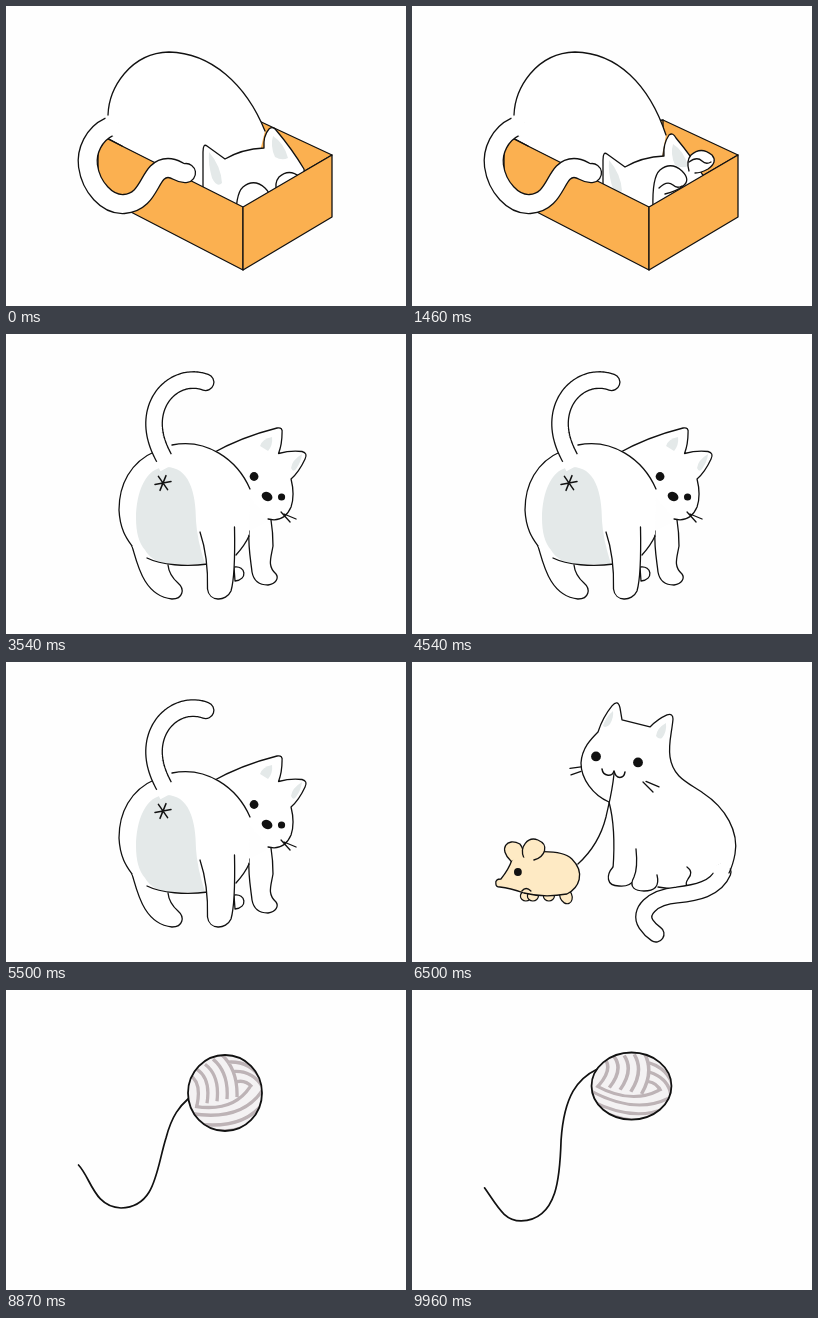
Animation of 400 by 300 pixels, one loop 10 s. Source, as an HTML page with a canvas:

```html
<!DOCTYPE html>
<html lang="en">
<head>
<meta charset="utf-8">
<title>Cats</title>
<style>
html, body { margin: 0; width: 100%; height: 100%; overflow: hidden; background: #fff; }
canvas { display: block; width: 400px; height: 300px; }
</style>
</head>
<body>
<canvas id="stage" width="400" height="300"></canvas>
<script>
const ctx = document.getElementById('stage').getContext('2d');
const INK = '#111', GREY = '#e4e9e9', ORANGE = '#fbb050', TAN = '#feeac4';
const LOOP = 10000;
ctx.lineJoin = 'round';

const wave = (t, period) => (1 - Math.cos(2 * Math.PI * t / period)) / 2;
const mix = (a, b, k) => a + (b - a) * k;

function draw(d, fill, line = 1.3) {
  const p = new Path2D(d);
  if (fill) { ctx.fillStyle = fill; ctx.fill(p); }
  if (line) {
    ctx.strokeStyle = INK;
    ctx.lineWidth = line;
    ctx.lineCap = 'round';
    ctx.stroke(p);
  }
}

function oval(x, y, rx, ry = rx, turn = 0, fill = INK, line = 0) {
  ctx.beginPath();
  ctx.ellipse(x, y, rx, ry, turn, 0, 7);
  ctx.fillStyle = fill;
  ctx.fill();
  if (line) { ctx.lineWidth = line; ctx.strokeStyle = INK; ctx.stroke(); }
}

function at(x, y, fn) {
  ctx.save();
  ctx.translate(x, y);
  fn();
  ctx.restore();
}

// White tube with an ink edge; the root hides the cap where it joins the body.
function tube(path, width, root) {
  for (const [color, w] of [[INK, width + 1.3], ['#fff', width - 1.3]]) {
    ctx.lineCap = 'round';
    ctx.strokeStyle = color;
    ctx.lineWidth = w;
    ctx.stroke(path);
  }
  ctx.lineCap = 'butt';
  ctx.lineWidth = width + 2;
  ctx.stroke(new Path2D(root));
}

function boxScene(t) {
  const q = wave(t, 973);
  draw('M251 114L326 149L237 201L104 133Z', ORANGE);
  draw('M251 114V150');
  const back = `M102 109C103 82 124 47 163 46C205 47 ${240 - 3 * q} 78 ${259 - 5 * q} ${125 + 4 * q}`;
  draw(back + 'L240 202L190 178L103 133Z', '#fff', 0);

  at(-6 * q, 8 * q, () => {
    draw(`M197 185V146Q197 137 201 140L219 153Q236 143 258 142
      Q257 130 263 ${123 - 2 * q}Q267 ${120 - 2 * q} 270 124Q286 143 298 163L300 190L240 215Z`, '#fff');
    draw('M203 146Q202 158 206 172Q211 182 216 177Q215 160 203 146Z', GREY, 0);
    draw('M267 130Q264 140 269 151Q276 155 282 152Q278 137 267 130Z', GREY, 0);
  });

  at(mix(246, 257, q), mix(191, 174, q), () => {
    draw('M-16 28Q-17 -3 -9 -10Q2 -19 13 -9Q22 0 14 6Q8 11 -4 14', '#fff');
    if (q > 0.3) draw('M-10 8Q-2 0 4 5Q8 9 13 6');
  });
  at(mix(283, 289, q), mix(177, 155, q), () => {
    draw('M-12 10Q-15 0 -10 -6Q0 -15 11 -6Q17 1 7 8Q0 12 -6 12', '#fff');
    if (q > 0.3) draw('M-12 1Q-4 -5 1 0Q5 4 10 1');
  });

  draw('M92 128L237 201V264L92 189Z', ORANGE);
  draw('M237 201L326 149V211L237 264Z', ORANGE);
  tube(new Path2D(`M103 121C88 128 80 145 82 160C85 181 101 199 118 198
    C146 196 142 162 162 162C171 162 173 168 180 167`), 19, 'M103 121L113 117');
  draw('M103 133L116 140');
  draw(back);
}

function waggingTail(w) {
  const path = new Path2D(), steps = 40, step = 114 / steps;
  const heading = s => w * (-28 + 140 * s ** 1.4) * Math.PI / 180;
  const x0 = 158, y0 = 124;
  let x = x0, y = y0;
  path.moveTo(x, y);
  for (let i = 0; i < steps; i++) {
    const a = heading((i + 0.5) / steps);
    x += step * Math.sin(a);
    y -= step * Math.cos(a);
    path.lineTo(x, y);
  }
  const a = heading(0);
  tube(path, 16.5, `M${x0} ${y0}L${x0 - 10 * Math.sin(a)} ${y0 + 10 * Math.cos(a)}`);
}

function backScene(t) {
  const k = wave(t, 1000);
  const w = 1 - (t >= 2000 ? 2.1 : 0.2) * k;

  draw('M228 233C240 231 242 246 229 247Z', '#fff');
  draw(`M243 197C242 214 245 228 246 238C248 249 256 251 262 251C270 250 273 244 270 240
    C261 232 265 224 267 212Q267 198 265 186`, '#fff');
  at(12 * k, 0, () => {
    draw(`M205 120Q235 103 271 94Q277 93 276 99Q276 110 272.5 119.5Q285 116 296 117.5
      Q302 119 299 125Q293 138 285 145Q289 161 285 173Q278 189 262 185`, '#fff');
    draw('M266 103Q256 105 254 112L262 117Q267 111 266 103Z', GREY, 0);
    draw('M296 120Q286 126 285 134Q287 139 290 135Q295 128 296 120Z', GREY, 0);
    oval(248, 142.5, 4.4);
    oval(275.5, 163, 3.6);
    oval(261, 162.5, 5.6, 4.4, 0.45);
    draw('M275 178L284 188M278 180L290 185');
  });
  draw('M126 212C131 228 137 262 166 265C177 265 179 255 172 249Q163 241 162 231', '#fff');
  draw(`M150 117C124 128 113 151 113 176C114 196 121 205 126 212Q135 226 159 230H197L229 221L243 200
    L244 155C231 125 200 104 166 111Z`, '#fff', 0);
  draw('M150 117C124 128 113 151 113 176C114 196 121 205 126 212M166 111C200 104 231 125 244 155M230 221Q239 211 243 202');
  draw(`M160 133C139 133 130 160 130 184Q130 206 139 216Q147 230 168 230H199
    Q191 205 190 187C190 158 183 133 160 133Z`, GREY, 0);
  draw('M141 224C155 231 180 233 202 230');
  draw(`M194 198C201 219 202 238 201.5 255C203 268 220 268 225 257C229 243 229 218 228.5 193`, '#fff');
  draw('M196 199L227 194', '#fff', 0);
  draw('M149 150.4L165 147.6M152.4 142.4L161.6 155.6M160 141.6L154 156.4', null, 1.5);
  waggingTail(w);
}

function mouse(x) {
  at(x, 0, () => {
    for (const fx of [114, 121, 137]) oval(fx, 234, 5.5, 5, 0, TAN, 1.2);
    oval(154, 234, 6, 8, -0.4, TAN, 1.2);
    draw(`M84 222Q83 217 89 217Q97 207 100 198C111 187 150 187 160 197
      C174 211 167 226 155 232Q132 236 112 231Q98 226 88 225Q84 225 84 222Z`, TAN);
    draw('M99 199C86 187 95 175 108 182Q112 187 112 194', TAN);
    draw('M112 196C107 185 116 174 126 178C138 183 133 195 122 198', TAN);
    draw('M101 200Q106 193 119 197L120 205L104 208Z', TAN, 0);
    oval(106, 210, 3.9);
    draw('M110 229Q114 224 119 229');
  });
}

function toyScene(t) {
  const k = wave(t, 1000), h = -15 * k, swing = -28 * k;
  const y = v => v + h;
  const outline = `M201 207Q204 166 197 140C181 ${y(133)} 169 ${y(117)} 169 ${y(101)}
    C170 ${y(86)} 179 ${y(77)} 186 ${y(70)}Q191 ${y(55)} 200 ${y(44)}Q206 ${y(37)} 208 ${y(46)}
    L210 ${y(58)}L238 ${y(65)}Q246 ${y(57)} 255 ${y(53)}Q261 ${y(51)} 261 ${y(57)}
    C260 ${y(70)} 256 ${y(82)} 258 ${y(95)}C261 116 277 121 291 131
    C314 146 327 170 323 192Q321 203 317 211`;
  draw(outline + 'L300 222L246 227L202 220Z', '#fff', 0);
  draw('M246 225Q262 228 279 227M275 205Q282 210 276 217Q270 226 284 227');
  tube(new Path2D('M311 210C304 227 284 231 265 233C240 235 226 250 234 262Q238 268 244 272'),
    16, 'M311 210L307 202');
  draw(outline);
  draw('M201 205C194 213 194 224 207 224Q218 225 222 218L220 195Z', '#fff', 0);
  draw('M201 205C194 213 194 224 207 224Q218 225 222 218');
  draw('M224 187Q226 206 222 215C216 226 224 229 232 229C242 229 248 225 245 213', '#fff');
  draw(`M202 ${y(112)}C200 ${y(132)} 196 145 ${194 + swing / 4} 155Q${187 + swing / 2} 183 ${166 + swing} 202`);

  at(0, h, () => {
    draw('M201 49Q193 56 191 64Q194 67 198 62Q202 55 201 49Z', GREY, 0);
    draw('M254 61Q245 66 244 74Q247 78 250 76Q255 70 254 61Z', GREY, 0);
    oval(184, 94.5, 4.9);
    oval(226, 100.5, 4.9);
    draw('M190 107C191 115 201 115 202 109C204 118 212 117 213 110', null, 1.5);
    draw('M158 106.5L169 105M159 113L169 109.5M231 120L241 130M234 119.5L247 125');
  });
  mouse(swing);
}

function ballScene(t) {
  const u = wave(t - 1350, 623), m = (a, b) => mix(a, b, 2 * u);
  const endY = 108 - 78 * u + 40 * u * u;
  draw(`M72.5 ${m(175, 198)}C${m(85, 86)} ${m(188, 217)} ${m(88, 92)} ${m(217, 231)} ${m(115, 109)} ${m(218, 231)}
    C${m(150, 146)} ${m(217, 230)} ${m(150, 148)} ${m(180, 185)} ${m(160, 149)} ${m(148, 150)}
    C${m(166, 152)} ${m(125, 105)} ${m(174, 166)} ${m(116, 88)} ${m(183, 185)} ${endY}`, null, 1.7);

  const rx = 37 + 2 * u + 8 * u * u, ry = 38 - 9 * u;
  const cx = 219 + 2 * u * u, cy = 103 - 14 * u;
  ctx.save();
  ctx.translate(cx, cy);
  ctx.scale(rx / 37, ry / 37);
  oval(0, 0, 37, 37, 0, '#f4f2f3');
  ctx.beginPath();
  ctx.arc(0, 0, 37, 0, 7);
  ctx.clip();
  ctx.rotate(0.85 * u);
  ctx.strokeStyle = '#bdb3b6';
  ctx.lineWidth = 3.3;
  ctx.lineCap = 'butt';
  let d = '';
  for (let i = 0; i < 5; i++) {
    d += `M${-36 + 8 * i} ${-18 - 5 * i}Q${-23 + 9 * i} ${-11 - 3 * i} ${-28 + 10 * i} ${12 - 2 * i}`;
  }
  d += 'M-30 13Q8 19 25 -6M-34 20Q16 28 37 -2M-29 30Q18 36 38 10M-10 37Q18 38 33 24';
  d += 'M2 -30Q24 -32 36 -14M9 -21Q28 -22 38 -5M12 -11Q20 -13 27 -6';
  ctx.stroke(new Path2D(d));
  ctx.restore();
  ctx.beginPath();
  ctx.ellipse(cx, cy, rx, ry, 0, 0, 7);
  ctx.lineWidth = 1.8;
  ctx.strokeStyle = INK;
  ctx.stroke();
}

const scenes = [[7520, ballScene], [5520, toyScene], [1520, backScene], [0, boxScene]];
const began = performance.now();

function frame(now) {
  const t = Math.max(0, now - began) % LOOP;
  ctx.fillStyle = '#fefefe';
  ctx.fillRect(0, 0, 400, 300);
  const [start, scene] = scenes.find(s => t >= s[0]);
  scene(t - start);
  requestAnimationFrame(frame);
}
frame(began);
</script>
</body>
</html>
```
